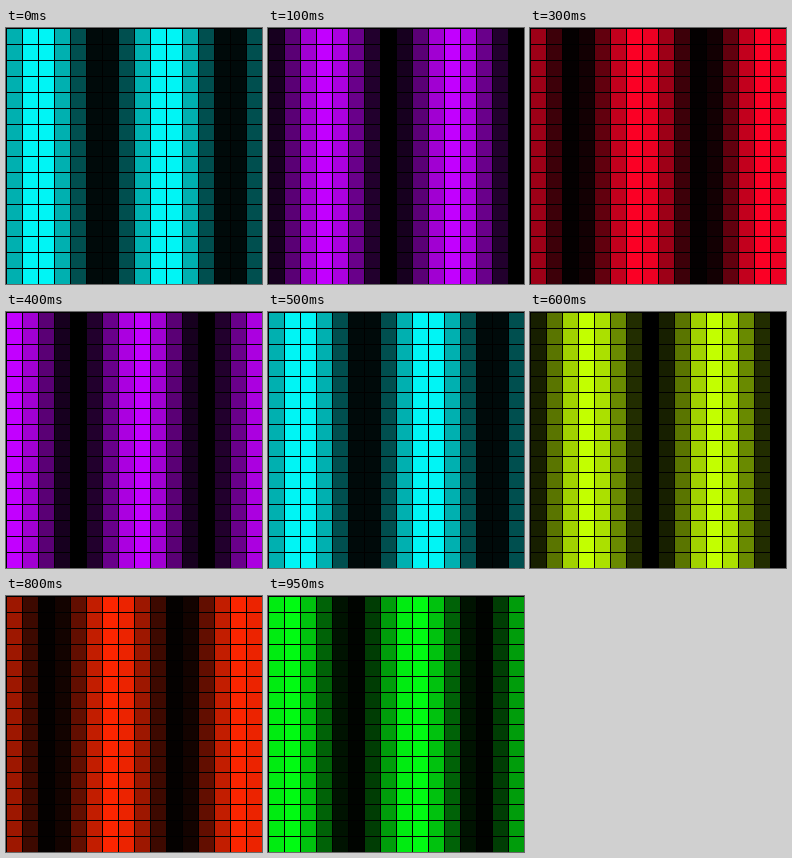
An HTML page with a canvas that plays this animation: 256 px wide and 256 px high, repeating every 1 s.

```html
<!DOCTYPE html>
<html lang="en">
<head>
<meta charset="utf-8">
<title>Colour wave</title>
<style>
  html, body { margin: 0; width: 100%; height: 100%; overflow: hidden; background: #000; }
  canvas { display: block; width: 256px; height: 256px; }
</style>
</head>
<body>
<canvas id="stage" width="256" height="256"></canvas>
<script>
  const ctx = document.getElementById('stage').getContext('2d');
  const SIZE = 256, CELLS = 16, CELL = SIZE / CELLS;
  const LOOP = 1000, STEPS = 20;
  const TAU = Math.PI * 2;

  // Fully saturated HSV to a CSS colour.
  function hsv(hue, value) {
    const channel = n => {
      const k = (n + hue / 60) % 6;
      return Math.round(255 * value * (1 - Math.max(0, Math.min(k, 4 - k, 1))));
    };
    return `rgb(${channel(5)}, ${channel(3)}, ${channel(1)})`;
  }

  function draw(t) {
    const hue = 180 + 180 * Math.sin(TAU * t);
    ctx.fillStyle = '#000';
    ctx.fillRect(0, 0, SIZE, SIZE);
    for (let col = 0; col < CELLS; col++) {
      const phase = 2 * ((col + 0.5) / CELLS - t);
      ctx.fillStyle = hsv(hue, 0.5 + 0.5 * Math.sin(TAU * phase));
      for (let row = 0; row < CELLS; row++) {
        ctx.fillRect(col * CELL + 1, row * CELL + 1, CELL - 1, CELL - 1);
      }
    }
  }

  const start = performance.now();
  function tick() {
    const ms = (performance.now() - start) % LOOP;
    draw(Math.floor(ms * STEPS / LOOP) / STEPS);
    requestAnimationFrame(tick);
  }
  tick();
</script>
</body>
</html>
```
